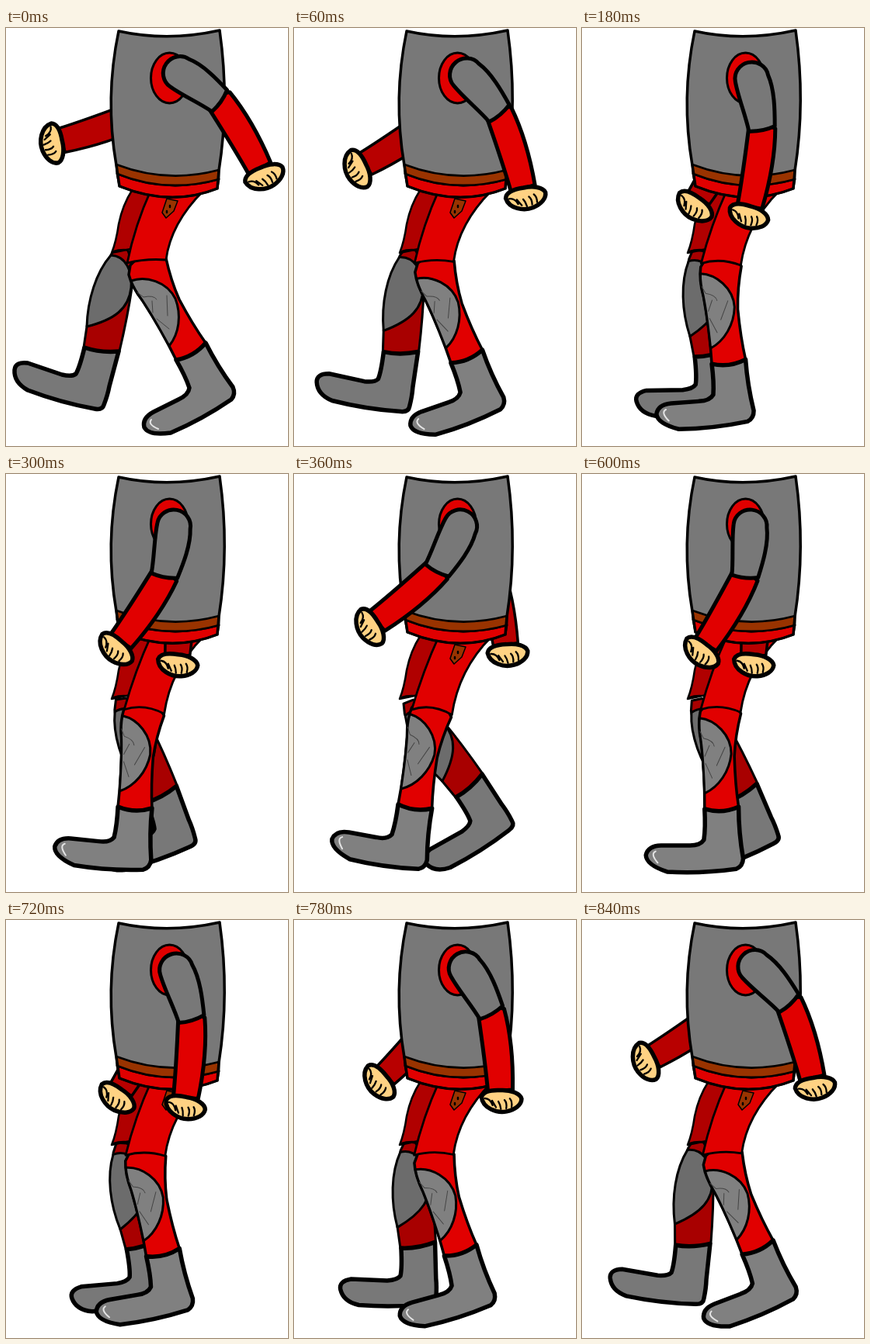
Animation of 363x539 px, one loop 0.9 s. Source, as an HTML page with a canvas:

```html
<!DOCTYPE html>
<html lang="en">
<head>
<meta charset="utf-8">
<title>Walk cycle</title>
<style>
html, body { margin: 0; width: 100%; height: 100%; overflow: hidden; background: #fff; }
canvas { display: block; }
</style>
</head>
<body>
<canvas id="stage" width="363" height="539"></canvas>
<script>
const ctx = document.getElementById('stage').getContext('2d');
const STEP = 60, STEPS = 15, RAD = Math.PI / 180;
const RED = '#e10000', SLEEVE = '#b80000', THIGH = '#b00000', SHIN = '#a80000';
const GRAY = '#808080', SHADE = '#787878', FAR_PATCH = '#6c6c6c';
const BROWN = '#993300', SKIN = '#ffd283';
const SHOULDER = [215, 66], UPPER = 66, FORE = 114;

// step, near upper arm, near forearm, far upper arm, far forearm, near shin, far shin (degrees)
const POSES = [
  [0, 65, 30.7, -46, -71, 0, 0],
  [3, 14.5, -8.8, -15, -28, 22.5, 19.6],
  [5, -9.7, -33.5, 5, 0, 32.5, 35],
  [7, -46, -66, 62, 24, 41.5, 61],
  [8, -32.7, -53, 48, 13, 36.3, 54],
  [10, -4.5, -29.8, 5, 0, 26.5, 38],
  [12, 21, -4.1, -17, -28, 16.7, 24],
  [14, 51.2, 17.3, -36, -56, 5.7, 8.9],
  [15, 65, 30.7, -46, -71, 0, 0]
];

function poseAt(step) {
  const i = POSES.findIndex(p => p[0] > step);
  const a = POSES[i - 1], b = POSES[i];
  const u = (step - a[0]) / (b[0] - a[0]);
  return a.map((v, n) => v + (b[n] - v) * u).slice(1);
}

function shape(path, fill, width, color = '#000') {
  const p = new Path2D(path);
  if (fill) { ctx.fillStyle = fill; ctx.fill(p); }
  if (width) { ctx.lineWidth = width; ctx.strokeStyle = color; ctx.stroke(p); }
}

function placed(x, y, degrees, draw, px = 0, py = 0) {
  ctx.save();
  ctx.translate(x, y);
  ctx.rotate(degrees * RAD);
  ctx.translate(-px, -py);
  draw();
  ctx.restore();
}

const reach = ([x, y], degrees, length) =>
  [x + Math.sin(degrees * RAD) * length, y + Math.cos(degrees * RAD) * length];

function hand() {
  shape('M-25 -7C-22 -15 -11 -15 1 -13C14 -12 25 -6 26 1C25 9 16 14 5 15C-8 16 -25 7 -25 -7Z', SKIN, 5.5);
  shape('M-21 -5Q-14 -4 -12 5M-12 -1L-8 8M-4 1Q-2 5 -2 11M4 0Q7 4 5 11M11 -1Q14 3 12 10', null, 2.3);
}

function forearm(elbow, angle, color, width) {
  placed(...elbow, -angle, () => {
    shape('M-17 -3Q0 -10 17 -3C22 30 21 65 16 102L-16 102C-15 65 -16 30 -17 -3Z', color, width);
  });
  placed(...reach(elbow, angle, FORE), -angle, hand);
}

function nearArm(upper, fore) {
  const elbow = reach(SHOULDER, upper, UPPER);
  const cap = [217 + upper * 0.1, 67 - Math.max(0, upper) * 0.14];
  const dx = elbow[0] - cap[0], dy = elbow[1] - cap[1];
  const len = Math.hypot(dx, dy);
  forearm(elbow, fore, RED, 5);
  placed(...cap, -Math.atan2(dx, dy) / RAD, () => {
    shape(`M-17 ${len}C-17 ${len * 0.7} -22 ${len * 0.3} -21.5 0A21.5 21 0 0 1 21.5 0` +
      `C26 ${len * 0.3} 21 ${len * 0.7} 17 ${len}Q0 ${len + 4} -17 ${len}Z`, SHADE, 5);
  });
}

function farLeg(angle) {
  const slide = angle / 6;
  placed(147 + slide, 298 + slide, -angle, () => {
    shape('M136 291L145 281L157 287Q164 305 162 335Q157 370 146 417Q122 420 100 412L104 385Q115 330 136 291Z', SHIN, 3);
    shape('M135 293C155 294 163 315 161 335C158 362 140 376 104 385C105 350 116 315 135 293Z', FAR_PATCH, 3);
    shape('M101 412Q95 437 90 446Q85 450 72 447L28 432Q12 430 11 441Q10 457 28 467Q70 483 114 491Q124 493 126 486Q131 473 133 462L145 417Q121 419 101 412Z', SHADE, 5.5);
  }, 147, 298);
  shape('M163 208Q150 228 145 253Q142 275 136 290L160 285L190 212Z', THIGH, 2.5);
  shape('M138 288Q146 285 157 286', null, 2);
}

function nearLeg(angle) {
  const k = angle / 41.5;
  placed(181 - 3 * k, 304, angle, () => {
    shape('M160 306Q180 282 206 297Q212 325 223 350Q240 382 257 406Q242 424 219 428Q200 389 176 352Q162 334 158 318Z', RED, 3.5);
    shape('M161 326C180 319 207 327 218 349C226 370 223 394 210 410C198 388 188 370 176 352Q165 337 161 326Z', GRAY, 3);
    shape('M169 341L177 347Q190 344 194 350M188 352L189 367M207 345L208 371M194 375L210 388', null, 1, '#444');
    shape('M219 428Q231 449 236 464Q235 473 222 479L190 495Q175 503 178 515Q184 526 212 522Q252 505 290 479Q296 472 292 463Q272 436 257 406Q242 424 219 428Z', GRAY, 5.5);
    shape('M187 505Q182 511 196 517', null, 2, '#e4e4e4');
  }, 181, 304);
  const left = `${156 - 5 * k} ${303 + k}`, right = `${206 - 3 * k} ${299 + 13 * k}`;
  shape(`M187 208Q166 254 ${left}Q${180 - 3 * k} ${297 - 2 * k} ${right}Q212 252 254 210Z`, RED, 2.8);
  shape('M207 220L221 223L216 236L206 245L201 238Z', BROWN, 1.5);
  shape('M211 229v2M207 236v2', null, 2.5);
}

function torso() {
  const outline = 'M145 4Q208 18 275 3Q288 95 274 184L272 207Q212 231 146 204L142 177Q127 90 145 4Z';
  shape(outline, SHADE);
  shape('M143 188Q207 214 274 195L272 207Q212 231 146 204Z', RED, 2.8);
  shape('M142 176Q207 201 274 183L274 195Q207 214 143 188Z', BROWN, 2.8);
  shape(outline, null, 3.5);
  shape('M186.5 64.5a24 32.5 0 1 1 48 0a24 32.5 0 1 1 -48 0Z', RED, 3);
}

function frame(now) {
  const [nearUpper, nearFore, farUpper, farFore, nearShin, farShin] =
    poseAt(Math.floor(now / STEP) % STEPS);
  ctx.fillStyle = '#fff';
  ctx.fillRect(0, 0, 363, 539);
  ctx.lineJoin = ctx.lineCap = 'round';
  farLeg(farShin);
  nearLeg(nearShin);
  forearm(reach(SHOULDER, farUpper, UPPER), farFore, SLEEVE, 3.5);
  torso();
  nearArm(nearUpper, nearFore);
}

let start;
function loop(now) {
  start ??= now;
  frame(Math.max(0, now - start));
  requestAnimationFrame(loop);
}
frame(0);
requestAnimationFrame(loop);
</script>
</body>
</html>
```
